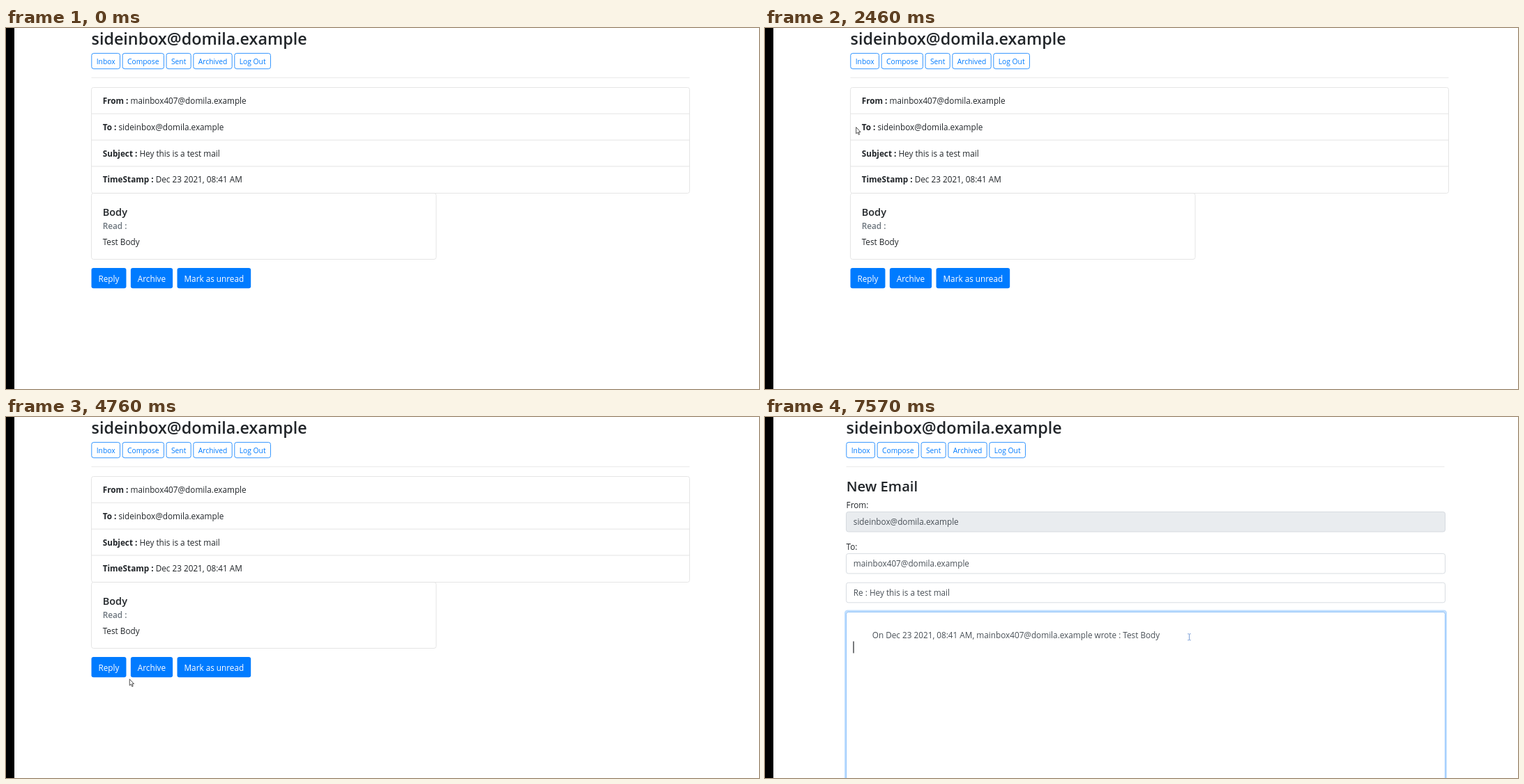
An HTML page that plays this animation: 1080 px wide and 519 px high, repeating every 8 s.

```html
<!DOCTYPE html>
<html lang="en">
<head>
<meta charset="utf-8">
<title>Mail reply</title>
<style>
  html, body { margin: 0; width: 100%; height: 100%; overflow: hidden; background: #fff; }
  svg { display: block; width: 100vw; height: 100vh; }
  text { font: 11.75px "Open Sans", "Noto Sans", sans-serif; fill: #212529; white-space: pre; }
  rect, line { stroke-width: 0.8; }
  .h2 { font-size: 23.3px; font-weight: 600; }
  .h3 { font-size: 20.2px; font-weight: 600; }
  .h5 { font-size: 14.5px; font-weight: 600; }
  .bold { font-weight: 700; }
  .muted { font-weight: 600; fill: #6c757d; }
  .field { fill: #495057; }
  .nav { font-size: 10.3px; fill: #007bff; }
  .label { fill: #fff; }
  .frame { fill: #fff; stroke: #dfdfdf; }
  .input { fill: #fff; stroke: #ced4da; }
  .readonly { fill: #e9ecef; }
  .link { fill: #fff; stroke: #007bff; }
  .button { fill: #007bff; }
  .button.hover { fill: #0069d9; }
  .button.pressed { fill: #0062cc; stroke: #80bdff; stroke-width: 2; }
  .rule { stroke: #e5e5e5; }
  .ring { fill: none; stroke: #bfdeff; stroke-width: 2.4; }
  .focus { fill: none; stroke: #80bdff; }
</style>
</head>
<body>
<svg id="stage" viewBox="0 0 1080 519" preserveAspectRatio="none"></svg>
<script>
const LOOP = 8000;
const STEP = 64.5;     // pointer refresh
const APPEAR = 230;
const PRESS = 5200;
const OPEN_FORM = 5280;
const FOCUS = 6870;
const NEW_LINE = 7570;

const OWNER = "sideinbox@domila.example";
const SENDER = "mainbox407@domila.example";
const SUBJECT = "Hey this is a test mail";
const DATE = "Dec 23 2021, 08:41 AM";

const stage = document.getElementById("stage");

function add(parent, tag, attrs = {}, content = "") {
  const el = document.createElementNS("http://www.w3.org/2000/svg", tag);
  for (const key in attrs) el.setAttribute(key, attrs[key]);
  el.textContent = content;
  parent.append(el);
  return el;
}
const text = (parent, x, y, content, cls = "") => add(parent, "text", { x, y, class: cls }, content);
const box = (parent, x, y, width, height, cls) =>
  add(parent, "rect", { x, y, width, height, rx: 3, class: cls });
const line = (parent, y, cls) => add(parent, "line", { x1: 122.5, x2: 980.5, y1: y, y2: y, class: cls });
const show = (el, on) => el.setAttribute("visibility", on ? "visible" : "hidden");
const clamp = v => Math.max(0, Math.min(1, v));

// Buttons side by side, each as wide as its label plus padding
function buttonRow(parent, names, { x, y, height, pad, gap, baseline, cls, labelCls }) {
  return names.map(name => {
    const el = box(parent, x, y, 0, height, cls);
    const width = text(parent, x + pad, baseline, name, labelCls).getComputedTextLength() + pad * 2;
    el.setAttribute("width", width);
    const left = x;
    x += width + gap;
    return { el, left, right: left + width };
  });
}

function header(parent) {
  text(parent, 122.6, 24, OWNER, "h2");
  buttonRow(parent, ["Inbox", "Compose", "Sent", "Archived", "Log Out"],
    { x: 122.8, y: 36.4, height: 22.3, pad: 6.9, gap: 3.6, baseline: 51.6, cls: "link", labelCls: "nav" });
  line(parent, 71.5, "rule");
}

// Reading page
const mail = add(stage, "g");
header(mail);
box(mail, 122.5, 85.5, 858, 152, "frame");
const rows = [["From", SENDER], ["To", OWNER], ["Subject", SUBJECT], ["TimeStamp", DATE]];
const mailTexts = rows.map(([name, value], i) => {
  const y = 109 + i * 37.8;
  if (i) line(mail, y - 23.5, "frame");
  const row = text(mail, 138.7, y, "");
  add(row, "tspan", { class: "bold" }, name + " : ");
  add(row, "tspan", {}, value);
  return row;
});
box(mail, 122.5, 237.5, 494.5, 95, "frame");
mailTexts.push(
  text(mail, 138.7, 269.5, "Body", "h5"),
  text(mail, 138.7, 289.3, "Read :", "muted"),
  text(mail, 138.7, 312, "Test Body"));
const textAreas = mailTexts.map(el => el.getBBox());
const buttons = buttonRow(mail, ["Reply", "Archive", "Mark as unread"],
  { x: 122.5, y: 345, height: 29.3, pad: 10, gap: 6.4, baseline: 364.7, cls: "button", labelCls: "label" });

// Reply form
const form = add(stage, "g");
header(add(form, "g", { transform: "translate(-6 0)" }));
text(form, 116.8, 106.6, "New Email", "h3");

function field(y, value, cls = "", label = "") {
  text(form, 116.6, y - 5, label);
  box(form, 116.5, y, 859, 28.6, "input " + cls);
  text(form, 126.8, y + 19, value, "field");
}
field(136.4, OWNER, "readonly", "From:");
field(196.4, SENDER, "", "To:");
field(238.2, "Re : " + SUBJECT);
box(form, 116.5, 280.4, 859, 300, "input");
text(form, 153.8, 317.5, `On ${DATE}, ${SENDER} wrote : Test Body`, "field");
const focus = add(form, "g");
box(focus, 115.2, 278.8, 861.6, 300, "ring");
box(focus, 116.5, 280.4, 859, 300, "focus");
const caret = add(form, "rect", { width: 1.2, height: 17, fill: "#212529" });

add(stage, "rect", { width: 12, height: 519 });

// Pointer shapes, hotspot at 0,0
const pointer = add(stage, "g", { "stroke-width": 0.9, "stroke-linejoin": "round" });
const shapes = {
  arrow: "M.4 .4V9.6L2.5 7.8L4 11.2L5.4 10.6L4 7.3H6.7Z",
  hand: "M-1 .8Q0-.4 1 .8V4L5 4.8Q6 5 6 6V8L5 11H0L-3.2 7Q-3.2 5.6-1 7Z",
  beam: "M-2.3-4.5H-.6L0-4L.6-4.5H2.3M0-4V4M-2.3 4.5H-.6L0 4L.6 4.5H2.3"
};
for (const name in shapes) {
  shapes[name] = add(pointer, "path", { d: shapes[name], fill: name === "beam" ? "none" : "#fff" });
}

// Stops of the pointer: time, x, y
const stops = [
  [APPEAR, 497, 503], [700, 260, 205], [1060, 212, 350], [1530, 183, 118],
  [2150, 368, 107], [2520, 125, 143], [2800, 472, 65], [3120, 175.5, 248.5],
  [3290, 85, 414], [3530, 287, 179], [3940, 152, 360], [4440, 152, 360],
  [4760, 177, 376.5], [4900, 184, 407], [5260, 160.3, 364], [6310, 431.7, 384.5], [6890, 608.5, 316.3]
];

function position(t) {
  const i = stops.findIndex(s => s[0] > t);
  if (i < 1) return stops.at(i).slice(1);
  const [t0, x0, y0] = stops[i - 1];
  const [t1, x1, y1] = stops[i];
  const k = (t - t0) / (t1 - t0);
  const ease = k * k * (3 - 2 * k);
  return [x0 + (x1 - x0) * ease, y0 + (y1 - y0) * ease];
}

function drawPointer(t, replying) {
  const [x, y] = position(APPEAR + Math.round((t - APPEAR) / STEP) * STEP);
  const over = b => x > b.left && x < b.right && y > 345 && y < 374;
  const inside = a => x > a.x && x < a.x + a.width && y > a.y && y < a.y + a.height;
  const kind = replying || textAreas.some(inside) ? "beam" : buttons.some(over) ? "hand" : "arrow";
  for (const name in shapes) shapes[name].setAttribute("display", name === kind ? "inline" : "none");
  const tinted = (t >= 2710 && t < 3530) || t >= 6940;
  pointer.setAttribute("stroke", tinted ? "#6f95d2" : "#3c3c3c");
  pointer.setAttribute("transform", `translate(${x} ${y})`);
  show(pointer, t >= APPEAR);

  buttons.forEach((b, i) => {
    const state = i === 0 && t >= PRESS ? " pressed" : over(b) ? " hover" : "";
    b.el.setAttribute("class", "button" + state);
  });
}

function draw(t) {
  const replying = t >= OPEN_FORM;
  show(mail, !replying);
  show(form, replying);
  drawPointer(t, replying);

  focus.setAttribute("opacity", clamp((t - FOCUS) / 150));
  const newLine = t >= NEW_LINE;
  show(caret, newLine || (t >= FOCUS && t < FOCUS + 520));
  caret.setAttribute("x", newLine ? 126.4 : 566);
  caret.setAttribute("y", newLine ? 322.5 : 304);
}

const begin = performance.now();
function tick() {
  draw((performance.now() - begin) % LOOP);
  requestAnimationFrame(tick);
}
tick();
</script>
</body>
</html>
```
